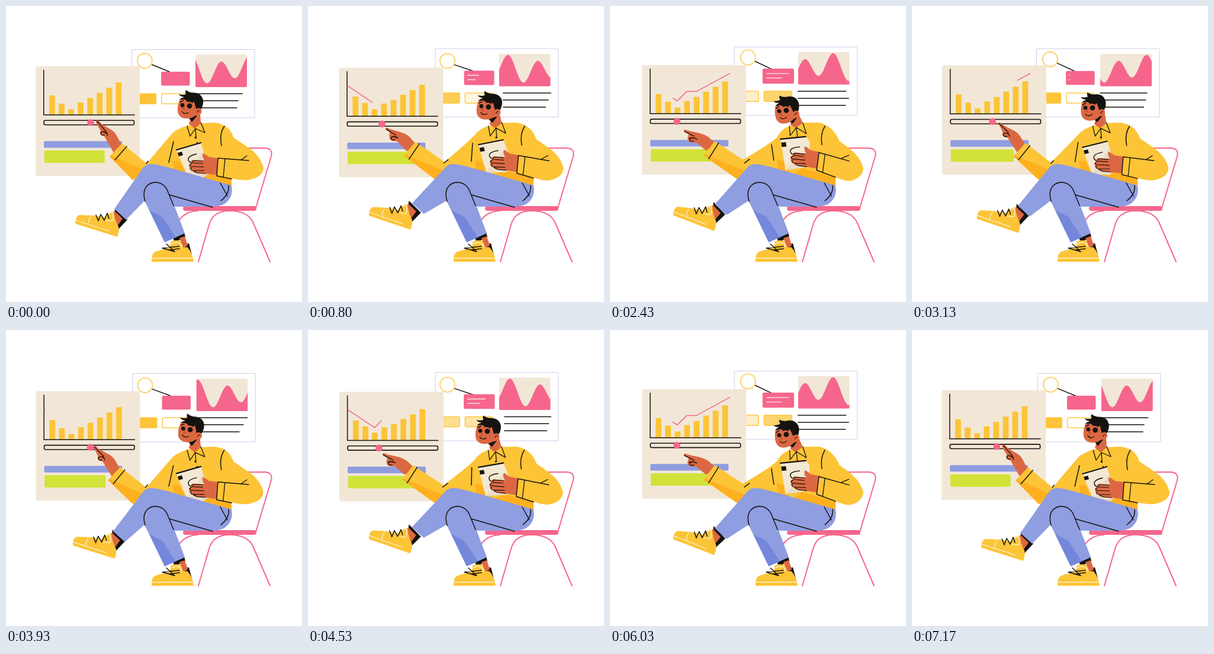
Animation of 500 by 500 pixels, one loop 7.21 s. Source, as an HTML page with a canvas:

```html
<!DOCTYPE html>
<html lang="en">
<head>
<meta charset="utf-8">
<title>Analyst at work</title>
<style>
html, body { margin: 0; width: 100%; height: 100%; overflow: hidden; background: #fff; }
canvas { display: block; width: 500px; height: 500px; }
</style>
</head>
<body>
<canvas id="stage"></canvas>
<script>
const canvas = document.getElementById('stage');
const ctx = canvas.getContext('2d');
const ratio = window.devicePixelRatio || 1;
canvas.width = canvas.height = 500 * ratio;

const CYCLE = 3605;
const INK = '#15130f', YELLOW = '#fcc436', ORANGE = '#ffb01f', PINK = '#f6668c';
const SKIN = '#dc6843', BLUE = '#8f9de1', SHADE = '#7487db', BEIGE = '#f2e7d7', GREEN = '#d1e338';

const rad = deg => deg * Math.PI / 180;
const lerp = (a, b, p) => a + (b - a) * p;
const ease = (t, a, b) => {
  const u = Math.min(1, Math.max(0, (t - a) / (b - a)));
  return (1 - Math.cos(Math.PI * u)) / 2;
};

// Smooth periodic curve through [time, value] pairs.
function curve(t, keys) {
  const n = keys.length;
  const key = i => {
    const turn = Math.floor(i / n), k = keys[i - turn * n];
    return [k[0] + turn * CYCLE, k[1]];
  };
  let i = n - 1;
  while (i > 0 && keys[i][0] > t) i--;
  const [a, b, c, d] = [key(i - 1), key(i), key(i + 1), key(i + 2)];
  const span = c[0] - b[0], u = (t - b[0]) / span;
  const m0 = (c[1] - a[1]) / (c[0] - a[0]) * span;
  const m1 = (d[1] - b[1]) / (d[0] - b[0]) * span;
  const u2 = u * u, u3 = u2 * u;
  return (2 * u3 - 3 * u2 + 1) * b[1] + (u3 - 2 * u2 + u) * m0
    + (3 * u2 - 2 * u3) * c[1] + (u3 - u2) * m1;
}

// Blend two path strings that share the same commands.
function morph(from, to, p) {
  const ends = to.match(/-?[\d.]+/g);
  let i = 0;
  return from.replace(/-?[\d.]+/g, v => lerp(+v, +ends[i++], p).toFixed(2) + ' ');
}

function fill(d, color) {
  ctx.fillStyle = color;
  ctx.fill(new Path2D(d));
}

function stroke(d, color = INK, width = 1.5) {
  ctx.strokeStyle = color;
  ctx.lineWidth = width;
  ctx.stroke(new Path2D(d));
}

function box(x, y, w, h, r, color, line, width = 1.5) {
  ctx.beginPath();
  ctx.roundRect(x, y, w, h, r);
  if (color) { ctx.fillStyle = color; ctx.fill(); }
  if (line) { ctx.strokeStyle = line; ctx.lineWidth = width; ctx.stroke(); }
}

function dot(x, y, r, color) {
  ctx.fillStyle = color;
  ctx.beginPath();
  ctx.arc(x, y, r, 0, Math.PI * 2);
  ctx.fill();
}

function group(x, y, angle, px, py, draw) {
  ctx.save();
  ctx.translate(px + x, py + y);
  ctx.rotate(rad(angle));
  ctx.translate(-px, -py);
  draw();
  ctx.restore();
}

function wave(t) {
  ctx.save();
  ctx.beginPath();
  ctx.roundRect(108, 9, 87, 55, 2);
  ctx.clip();
  ctx.fillStyle = BEIGE;
  ctx.fillRect(108, 9, 87, 55);
  ctx.beginPath();
  ctx.moveTo(108, 64);
  for (let x = 108; x <= 195; x++) {
    const a = ((x - 200) / 98 - t / CYCLE) * Math.PI * 2;
    ctx.lineTo(x, 34.6 - 18.6 * Math.cos(2 * a) - 5 * Math.cos(a) + 4.25 * Math.sin(a));
  }
  ctx.lineTo(195, 64);
  ctx.fillStyle = PINK;
  ctx.fill();
  ctx.restore();
}

function backPanel(t) {
  const turn = t / CYCLE * Math.PI * 2, sway = Math.sin(turn);
  ctx.save();
  ctx.translate(212 + 2.7 * sway, 70.6 + 2.5 * Math.cos(turn - 0.29));
  box(0.5, 0.5, 207.5, 115.5, 1, '#fff', '#cfcdea', 1);
  wave(t);

  const cx = 22.3 - 1.5 * sway, cy = 19.5 + 1.6 * sway;
  stroke(`M${cx + 11.5} ${cy + 6.3} L64 38`);
  dot(cx, cy, 12.5, '#fff');
  ctx.strokeStyle = '#fdd060';
  ctx.lineWidth = 1.8;
  ctx.stroke();

  const grow = ease(t, 500, 1100) * (1 - ease(t, 2600, 3200));
  box(50 - 2 * grow, 38 - grow, 48.5 + 4.8 * grow, 23.5 + 1.8 * grow, 2.5, PINK);
  if (grow > 0.02) {
    stroke(`M55 45.3 H${55 + 37 * grow} M55 52.8 H${55 + 25 * grow}`, '#ffe6ec', 1.4);
  }

  const on = ease(t, 650, 1250) * (1 - ease(t, 2150, 2950));
  const button = (x, alpha) => {
    box(x, 74.5, 48, 18.5, 2, '#fff');
    ctx.globalAlpha = alpha;
    box(x, 74.5, 48, 18.5, 2, YELLOW);
    ctx.globalAlpha = 1;
    box(x + 0.7, 75.2, 46.6, 17.1, 2, null, '#fdca4b', 1.5);
  };
  button(-6, 1 - on);
  button(50, on);

  const start = curve(t, [[0, 108], [330, 108], [1570, 124], [2430, 108], [3200, 108]]);
  const ends = [[187, 194, 195, 189], [180, 187.5, 194.5, 193.5], [178, 180.5, 195, 188]];
  ends.forEach((e, i) => {
    const end = curve(t, [[0, e[0]], [330, e[1]], [1570, e[2]], [2430, e[3]]]);
    stroke(`M${start} ${75.2 + 11.9 * i} H${end}`);
  });
  ctx.restore();
}

function trend(t) {
  const points = [[14, 30], [59.5, 60.5], [75.5, 44.5], [92, 44.5], [149, 13.5]];
  let length = 0;
  ctx.beginPath();
  points.forEach(([x, y], i) => {
    if (i) length += Math.hypot(x - points[i - 1][0], y - points[i - 1][1]);
    ctx.lineTo(x, y);
  });
  const from = ease(t, 1760, 3620) * length, to = ease(t, 200, 1750) * length;
  if (to - from < 0.1) return;
  ctx.save();
  ctx.lineCap = 'butt';
  ctx.setLineDash([to - from, length * 2]);
  ctx.lineDashOffset = -from;
  ctx.strokeStyle = PINK;
  ctx.lineWidth = 1.5;
  ctx.stroke();
  ctx.restore();
}

function board(t) {
  const turn = t / CYCLE * Math.PI * 2;
  ctx.save();
  ctx.translate(52.8 - 2.8 * Math.cos(turn), 102 + 2.4 * Math.sin(turn));
  box(0, 0, 176, 185, 1, BEIGE);
  const low = [49, 63, 72.5, 61, 53.5, 44.5, 36, 27];
  const high = [48, 55, 66.8, 59.5, 55.3, 47, 39.5, 31];
  const shift = curve(t, [[0, 0], [330, 0.03], [1570, 1], [2430, 0.15], [2900, 0]]);
  low.forEach((y, i) => {
    const top = lerp(y, high[i], shift);
    box(23 + 16.07 * i, top, 9.8, 81.5 - top, 0, YELLOW);
  });
  stroke('M13.7 6.5 V82 H167');
  trend(t);
  box(14, 91.3, 152.5, 7.4, 2.5, null, INK, 1.6);
  dot(curve(t, [[0, 93], [330, 91.8], [1570, 44.5], [2430, 59], [3350, 92.5]]), 95, 5.8, PINK);
  box(14, 126.3, 132, 11.2, 2, BLUE);
  box(14.7, 142, curve(t, [[0, 102], [330, 103], [1570, 131], [2430, 122], [3350, 102]]), 21, 2, GREEN);
  ctx.restore();
}

function chair() {
  stroke('M396 240 H438 Q451 241 448 254 L422 341', PINK, 2);
  stroke('M325 432 L343.5 368 Q350 347 375 346', PINK, 2);
  stroke('M375 346 Q408 345 417.5 366 L446 432', PINK, 2);
  stroke('M290 366 Q300 347 324 346', PINK, 2);
  box(299, 338, 124, 8, 4, PINK);
}

function standingShoe() {
  fill('M282 392 L301 383 L303 390 L285 399 Z', INK);
  fill('M302 402 L309 401 L314 420 L304 412 Z', INK);
  fill('M293 392 L302 389 L307 404 L300 410 Z', SKIN);
  fill('M246 432 Q245 419 252 415 L269 410 Q279 408 278 398 Q286 394 295 397 L297 405 Q301 410 306 407 Q315 416 317 432 Z', YELLOW);
  stroke('M247 426 H315 M279 402 Q286 397 294 401 L296 407', '#fff3cd', 1.3);
  stroke('M271 402 L285 415 L264 409 L293 406 M276 412 L293 410');
}

function swingFoot(k, tilt) {
  group(-12 * k, -10 * k, tilt, 188, 388, () => {
    fill('M184 341 L205 361 L190 377 L183 362 Z', INK);
    fill('M183 346 L197 359 L187 373 L179 356 Z', SKIN);
    fill('M117 365 Q118 355 124 353 L149 354 L166 357 Q174 347 182 347 Q184 362 190 373 Q192 378 188 390 L118 368 Z', YELLOW);
    stroke('M118 362 L174 380 M143 356 Q139 361 140 367 M172 352 L180 348 Q182 358 180 363 L168 362', '#fff3cd', 1.3);
    stroke('M152 353 L156 363 L160 352 L166 362 L171 350 L174 359');
  });
}

function pants(k) {
  const x = -6 * k, y = -8 * k;
  fill(`M246 267 Q256 267 300 280 L381 303 Q385 324 368 335 Q360 339 342 339 L285 339 L302 384
    L268 399 L234 329 L${203 + x} ${361 + y} L${183 + x} ${343 + y} L231 274 Q237 266 246 267 Z`, BLUE);
  fill('M242 345 L264 356 L287 391 L268 399 Z', SHADE);
  stroke('M235 330 Q230 313 238 304 Q245 297 255 298 Q269 300 274 315 L283 337 M276 319 L349 340');
  stroke('M376 303 Q378 317 363 329 M362 299 L374 321');
}

function pointingArm(p) {
  fill(morph(
    'M182 248 L166 220 Q156 218 160 211 L154 201 Q150 194 154 193 Q157 193 161 199 L174 207 Q183 211 187 219 L198 240 Z',
    'M150 242 L134 237.5 Q116 241 113 231 L120 225.5 Q107 224 107 220 Q107 216.5 114 217.5 L135 219 Q148 221 155 224 L170 232 Z', p), SKIN);
  stroke(morph(
    'M154 195 L169 212 M169 215 Q163 210 160 214 Q160 219 166 218 M168 212 Q172 215 171 219',
    'M108 222 L126 225 M133 231 Q124 227 119 232 Q118 237 126 234 M113 230 Q120 226 127 227', p), INK, 1.4);
  fill(morph('M196 232 L240 268 L236 290 L214 294 L175 254 Z', 'M165 226 L222 259 L240 282 L216 292 L148 252 Z', p), YELLOW);
  fill(morph('M177 252 L175 254 L214 294 L231 276 Z', 'M150 250 L148 252 L216 292 L226 280 Z', p), ORANGE);
  stroke(morph('M204 237 L184 260', 'M171 228 L156 257', p));
}

function shirt(b, p) {
  fill(morph(
    'M306 202 Q288 208 281 215 Q268 230 237 267 L236 285 L381 304 L381 291 Q395 295 408 294 Q434 290 435 274 Q431 255 412 241 L384 222 Q378 200 352 197 L330 198 Z',
    'M303 203 Q289 208 282 223 Q268 235 221 259 L236 285 L381 304 L381 288 Q390 294 403 296 Q425 292 427 274 Q422 256 404 241 L388 229 Q376 202 353 197 L327 197 Z', b), YELLOW);
  fill(morph('M282 262 L292 262 L305 284 L284 277 Z', 'M282 259 L296 263 L305 284 L284 277 Z', b), ORANGE);
  fill(morph('M338 281 L381 291 V304 L320 288 Z', 'M322 273 L381 290 V304 L308 284 Z', b), ORANGE);
  stroke(morph('M283 229 L275 264', 'M271 235 L277 260', b));
  stroke(morph('M237 266 L240 262', 'M221 265 L233 257', p));
  stroke(morph('M369 203 Q360 216 364 236', 'M362 203 Q354 216 357 234', b));
  fill(morph('M313 186 L328 182 L329 198 L319 207 L309 199 Z', 'M305 190 L318 184 L325 197 L313 206 L304 201 Z', b), SKIN);
  fill(morph('M307 187 L323 185 L314 196 Z', 'M300 195 L315 189 L308 199 Z', b), INK);
  stroke(morph('M306 203 L311 220 L320 207 L336 214 L329 197 M320 207 L321 224', 'M303 203 L303 219 L314 205 L331 216 L325 197 M314 205 L316 221', b), INK, 1.3);
  dot(lerp(320, 315, b), 222, 1.5, INK);
  dot(323, 231, 1.3, INK);
}

function tablet(b) {
  fill(morph('M287 242 L329 230 L345 281 L333 290 L306 285 Z', 'M288 222 L331 218 L336 221 L337 268 L295 276 Z', b), '#f3e8d4');
  fill(morph('M333 243 L345 281 L333 290 L306 285 Z', 'M334 236 L336 250 L337 268 L295 276 Z', b), '#e9dcc6');
  stroke(morph('M288 243 L329 231', 'M288 222 L331 219', b), INK, 2.2);
  fill(morph('M290 248 L297 246 L299 252 L292 254 Z', 'M289 228 L297 227.5 L298 235 L290 235.5 Z', b), INK);
  stroke(morph('M322 250 Q307 253 308 260 Q309 264 314 265', 'M320 236 Q304 237 304 243 Q305 248 310 249', b));
}

function holdingHand(b) {
  group(-5 * b, -13 * b, 3 * b, 345, 270, () => {
    fill('M358 257 L343 255 L334 249 Q330 249 333 257 L335 261 L316 260 Q311 261 313 265 Q307 267 310 272 Q308 276 315 277 Q315 281 322 282 L344 284 L358 286 Z', SKIN);
    stroke('M333 262 L317 261 Q312 263 316 265 L332 266 M314 266 Q308 268 312 271 L334 272 M313 273 Q310 277 316 278 L335 278 M317 279 L323 282 L337 283', INK, 1.2);
  });
  fill(morph('M358 256 L410 260 L410 294 L390 293 L356 287 Z', 'M352 246 L402 261 L405 295 L390 291 L348 276 Z', b), YELLOW);
  stroke(morph('M410 261 L358 257 L356 287 L381 292', 'M403 262 L352 246 L348 276 L381 289', b));
  stroke(morph('M370 258 L367 289 M397 260 L407 253', 'M362 250 L358 279 M390 257 L403 252', b), INK, 1.3);
}

function head(t) {
  const x = curve(t, [[0, 0], [330, 0], [1570, -12.5], [2430, -8]]);
  const y = curve(t, [[0, 0], [330, 0], [1570, 4.5], [2430, 5.5]]);
  const tilt = curve(t, [[0, 0], [330, 3], [1570, -7], [2430, -12]]);
  group(x, y, tilt, 318, 190, () => {
    fill('M294 157 Q289 168 290 178 Q291 187 300 189.5 Q313 192 321 184 L328 174 L324 157 Z', SKIN);
    fill('M293 158 Q296 155 301 154 Q294 153 292 149 Q299 151 304 149 Q302 145 304 142 Q310 147 319 146.5 Q331 148 333 159 Q334 167 329 175 Q325 171 321 174 L318 162 Q308 163 302 158 Z', INK);
    fill('M319 179 Q321 171 328 173 Q333 178 328 183 Q324 185 319 183 Z', SKIN);
    stroke('M323 180 Q323 176 327 177', INK, 1);
    dot(298, 167.5, 3.4, INK);
    dot(310, 168.8, 4.4, INK);
    stroke('M294 162 L299 160 M306 161 Q311 159.5 315 163', INK, 1.7);
    stroke('M302 168 L299 174 L302 175', '#a9432c', 1);
    stroke('M297 178 Q301 184 308 180', INK, 1.3);
  });
}

function draw(now) {
  const t = now % CYCLE;
  const reach = curve(t, [[0, 0], [330, 0.1], [1570, 1], [2430, 0.62], [3300, 0.04]]);
  const lean = curve(t, [[0, 0], [330, 0.03], [1570, 1], [2430, 0.86], [3300, 0.06]]);
  const kick = (1 - Math.cos(4 * Math.PI * t / CYCLE)) * 0.63;
  const tilt = 3.6 * ease(t, 400, 1500) * (1 - ease(t, 2500, 3500));

  ctx.setTransform(ratio, 0, 0, ratio, 0, 0);
  ctx.fillStyle = '#fff';
  ctx.fillRect(0, 0, 500, 500);
  ctx.lineCap = ctx.lineJoin = 'round';

  backPanel(t);
  board(t);
  chair();
  standingShoe();
  pointingArm(reach);
  shirt(lean, reach);
  tablet(lean);
  holdingHand(lean);
  head(t);
  swingFoot(kick, tilt);
  pants(kick);
}

const begin = performance.now();
function frame() {
  draw(performance.now() - begin);
  requestAnimationFrame(frame);
}
frame();
</script>
</body>
</html>
```
